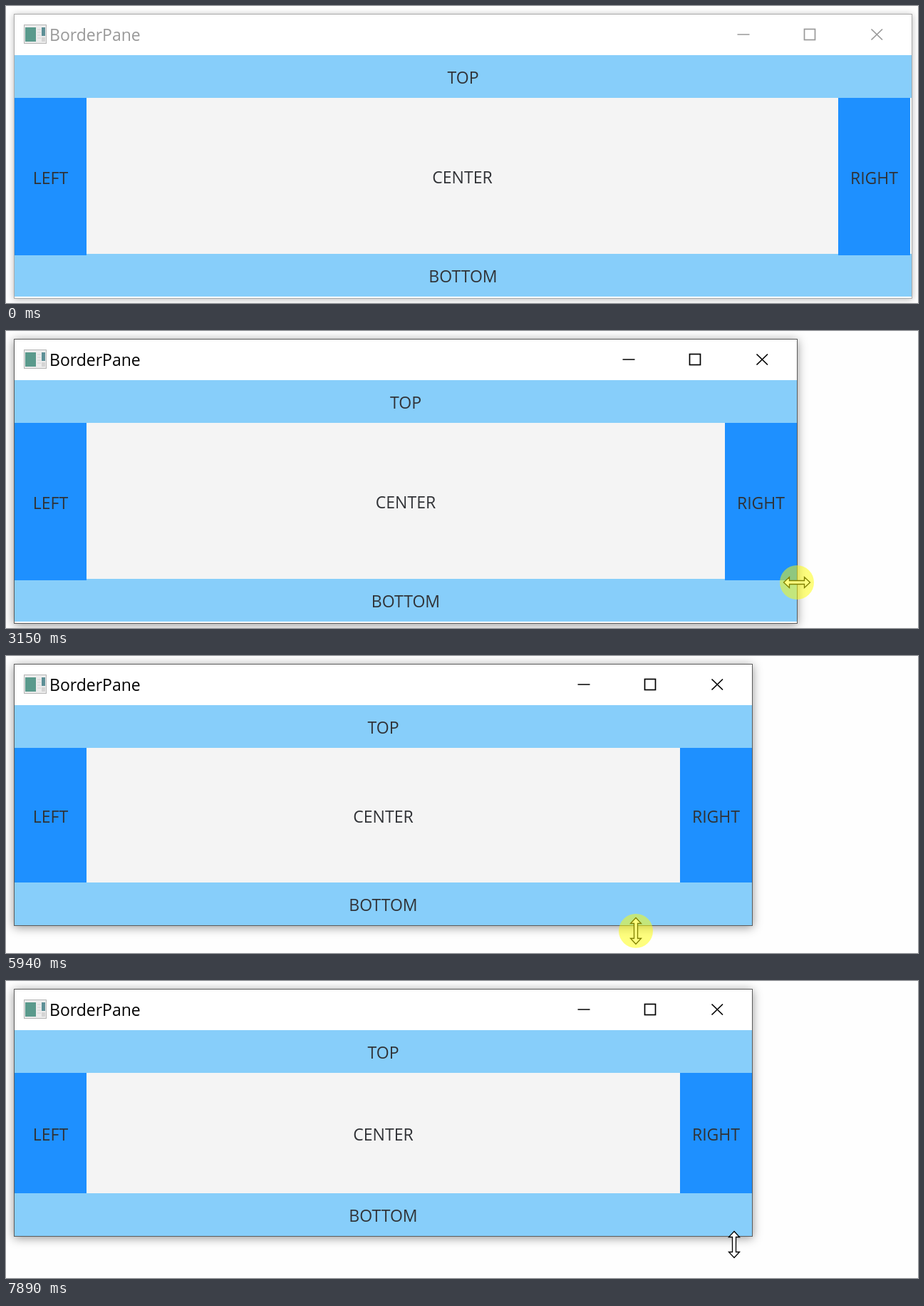
Recreate the animation shown at these times as an HTML page. Size 1280 by 417 pixels, loop 8 s.

```html
<!DOCTYPE html>
<html lang="en">
<head>
<meta charset="utf-8">
<title>BorderPane</title>
<style>
  html, body { margin: 0; width: 100%; height: 100%; overflow: hidden; background: #fefefe; }
  body { position: relative; font: 23px "Open Sans", "Noto Sans", sans-serif; color: #303236; }
  .window {
    --slack-x: 0px; --slack-y: 0px;
    position: absolute; left: 11px; top: 11px; box-sizing: border-box;
    border: 1px solid #5c5c5c; background: #fff;
    box-shadow: 0 2px 13px rgba(0, 0, 0, .42);
    --ink: #000;
  }
  .window.inactive { --ink: #999; border-color: #aaa; box-shadow: 0 1px 9px rgba(0, 0, 0, .28); }
  .window > * { position: absolute; box-sizing: border-box; }
  .title { left: 49px; top: 0; line-height: 57px; color: var(--ink); }
  .icon { left: 13px; top: 14px; }
  .buttons { right: 0; top: 0; fill: none; stroke: var(--ink); stroke-width: 1.7; }
  .region { display: flex; align-items: center; justify-content: center; padding-top: 2px; }
  .bar { left: 0; right: 0; height: 60px; background: #87cefa; }
  .top { top: 57px; }
  .bottom { bottom: var(--slack-y); }
  .center {
    top: 117px; bottom: calc(60px + var(--slack-y));
    left: 101px; right: calc(101px + var(--slack-x)); background: #f4f4f4;
  }
  .side { top: 117px; bottom: 60px; width: 101px; background: #1e90ff; }
  .left { left: 0; }
  .right { right: var(--slack-x); }
  .overlay { position: absolute; left: 0; top: 0; width: 100%; height: 100%; }
  .overlay path { fill: #fff; stroke: #000; stroke-width: 1.3; }
</style>
</head>
<body>
<div class="window" id="window">
  <svg class="icon" width="32" height="27">
    <rect x=".5" y=".5" width="31" height="26" fill="#ececec" stroke="#b5b5b5"/>
    <rect x="2" y="4" width="15" height="20" fill="#5a9a8c"/>
    <path d="M19 7H24M19 11H24M19 15H24M19 19H24" stroke="#d2d2d2"/>
    <rect x="25" y="4" width="5" height="12" fill="#5d8f96"/>
    <rect x="25" y="18" width="5" height="6" fill="#d4d4d4"/>
  </svg>
  <div class="title">BorderPane</div>
  <svg class="buttons" width="260" height="57">
    <path d="M15.5 28H32.5M203.5 20.5L219 35.5M219 20.5L203.5 35.5"/>
    <rect x="109.5" y="20.5" width="15" height="15"/>
  </svg>
  <div class="region bar top">TOP</div>
  <div class="region center">CENTER</div>
  <div class="region bar bottom">BOTTOM</div>
  <div class="region side left">LEFT</div>
  <div class="region side right">RIGHT</div>
</div>
<svg class="overlay">
  <g id="cursor">
    <path id="shape"/>
    <circle id="press" r="24" fill="#ff0" fill-opacity=".5"/>
  </g>
</svg>
<script>
  const LOOP = 8000;
  const INITIAL = { right: 1272, bottom: 411, x: 1190, y: 410 };

  // [first change ms, last change ms, number of changes, pose reached]
  const MOVES = [
    [250, 570, 5, { x: 1271, y: 354 }],
    [2280, 3010, 10, { right: 1122, x: 1121, y: 353 }],
    [3090, 3150, 2, { right: 1111, x: 1110 }],
    [3230, 3850, 9, { right: 853, x: 852, y: 357 }],
    [3920, 4000, 2, { right: 838, x: 837, y: 358 }],
    [4150, 4550, 6, { right: 949, x: 948, y: 360 }],
    [4630, 4950, 5, { right: 1048, x: 1046, y: 350 }],
    [5030, 5250, 4, { x: 889, y: 418 }],
    [5790, 5940, 3, { bottom: 379, x: 884, y: 386 }],
    [6250, 6630, 6, { bottom: 284, x: 866, y: 291 }],
    [7010, 7120, 2, { bottom: 323, x: 874, y: 331 }],
    [7180, 7330, 3, { bottom: 359, x: 886, y: 366 }],
    [7570, 7890, 5, { x: 1022, y: 370 }]
  ];

  const RESIZE = "M-18.5 0L-10.5-7.5V-2.5H10.5V-7.5L18.5 0 10.5 7.5V2.5H-10.5V7.5Z";
  const POINTER = "M0 0V27L6 21 10 30 14 28 10 20H19Z";

  const byId = id => document.getElementById(id);
  const win = byId("window"), cursor = byId("cursor"), shape = byId("shape"), press = byId("press");
  const within = (t, from, to) => t >= from && t < to;

  function poseAt(t) {
    const pose = { ...INITIAL };
    for (const [first, last, count, goal] of MOVES) {
      if (t < first) break;
      const gap = (last - first) / (count - 1);
      const done = Math.min(count, Math.floor((t - first) / gap + 1e-6) + 1) / count;
      for (const key in goal) pose[key] += (goal[key] - pose[key]) * done;
    }
    for (const key in pose) pose[key] = Math.round(pose[key]);
    return pose;
  }

  function draw(t) {
    const { right, bottom, x, y } = poseAt(t);
    const slackY = t < 5790 ? 2 : within(t, 7010, 7180) ? 1 : 0;
    win.classList.toggle("inactive", t < 1740);
    win.style.width = right - 11 + "px";
    win.style.height = bottom - 11 + "px";
    win.style.setProperty("--slack-x", (t < 2280 ? 2 : 0) + "px");
    win.style.setProperty("--slack-y", slackY + "px");

    const pointing = t < 570 || within(t, 5030, 5250);
    const pressed = within(t, 1740, 4950) || within(t, 5560, 7570);
    cursor.style.display = t < 250 ? "none" : "";
    cursor.setAttribute("transform", `translate(${x} ${y})`);
    shape.setAttribute("d", pointing ? POINTER : RESIZE);
    shape.setAttribute("transform", `rotate(${t >= 5250 ? 90 : 0})`);
    press.style.display = pressed ? "" : "none";
  }

  function tick() {
    draw(performance.now() % LOOP);
    requestAnimationFrame(tick);
  }
  tick();
</script>
</body>
</html>
```
